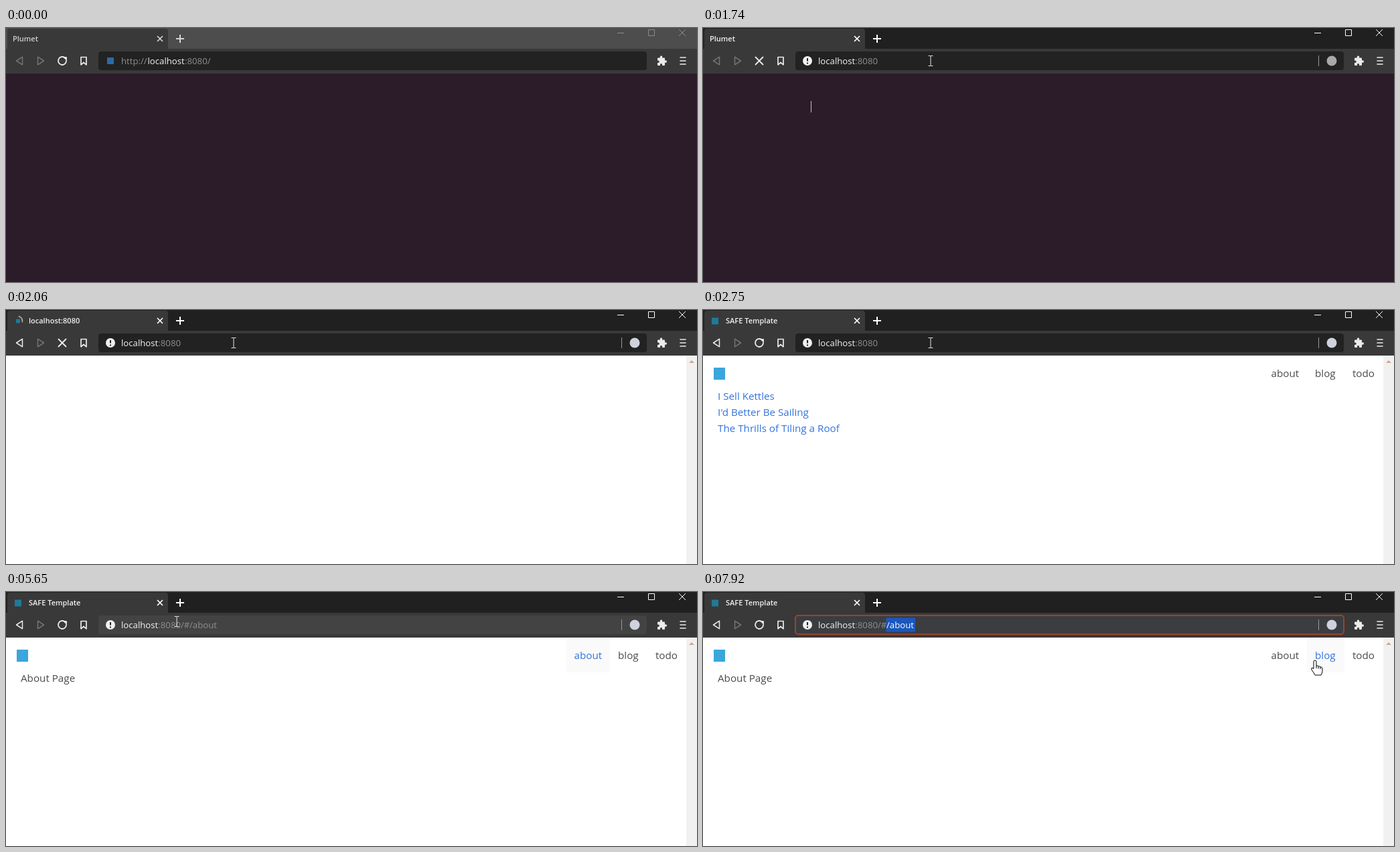
Animation of 1032x379 px, one loop 8 s. Source, as an HTML page:

```html
<!DOCTYPE html>
<html lang="en">
<head>
<meta charset="utf-8">
<title>Browser</title>
<style>
  html, body { margin: 0; width: 100%; height: 100%; overflow: hidden; background: #202020; }
  svg { display: block; width: 100%; height: 100%; }
  text { font-family: "Open Sans", "Noto Sans", sans-serif; white-space: pre; }
  .tab { font-size: 11px; font-weight: 600; }
  .url { font-size: 13.2px; fill: #8f8f8f; }
  .page { font-size: 15.2px; fill: #4a4a4a; }
  .page .link { fill: #3273dc; }
  .line { fill: none; stroke-linejoin: round; stroke-linecap: round; }
</style>
</head>
<body>
<svg viewBox="0 0 1032 379" preserveAspectRatio="none">
  <!-- title bar -->
  <rect id="titleBar" width="1032" height="32"/>
  <path d="M2 31V5q0-4 4-4h232q4 0 4 4v26z" fill="#393939"/>
  <rect id="spark" fill="#1d7b99"/>
  <path id="spinner" class="line" d="M22.5 11.2a7 7 0 0 1 0 9.6" stroke="#d3a78f" stroke-width="1.6"/>
  <text id="title" class="tab" y="20"></text>
  <g id="tabIcons" fill="none">
    <path d="M226 12l8 8m0-8l-8 8" stroke-width="1.7"/>
    <path d="M254 16h12m-6-6v12" stroke-width="2"/>
  </g>
  <path id="winIcons" fill="none" d="M913 7.5h10M959.5 2.5h9v9h-9zM1005 2l10 10m0-10l-10 10"/>

  <!-- toolbar -->
  <rect y="31" width="1032" height="37" fill="#393939"/>
  <g class="line" stroke-width="1.5" stroke="#ececec">
    <path id="back" d="M24.5 43.2v11.6L15.5 49z"/>
    <path d="M47.5 43.2v11.6l9-5.8z" stroke="#747474"/>
    <g id="reload" stroke-width="1.8">
      <path d="M87.6 44.2A6 6 0 1 0 90 49"/>
      <path d="M86.2 43.6h4.2v4.2z" fill="#ececec" stroke-width="1"/>
    </g>
    <path id="stop" d="M78.5 43.5l11 11m0-11l-11 11" stroke-width="1.8"/>
    <path d="M112 43.5h8v11.3l-4-3.3-4 3.3z" stroke-width="1.7"/>
    <path d="M1007 44h8m-8 5h8m-8 5h8" stroke-width="1.6"/>
  </g>
  <path fill="#ececec" d="M973 45.5q0-1 1-1h3q-.8-3 1.5-3t1.5 3h3q1 0 1 1v3q3-.8 3 1.5t-3 1.5v3.5q0 1-1 1h-3q.5-3-1.500-3t-1.500 3h-3q-1 0-1-1v-3q2.800.3 2.800-1.800t-2.800-1.700z"/>
  <rect id="bar" x="138" y="35" width="819" height="28" rx="4"/>
  <rect id="ring" x="138" y="35" width="819" height="28" rx="4" fill="none" stroke="#98432f" stroke-width="2"/>
  <rect id="siteMark" x="151" y="44" width="10" height="10" fill="#2d69a8"/>
  <g id="siteInfo">
    <circle cx="156" cy="49" r="7" fill="#f0f0f0"/>
    <path d="M156 45v4.500m0 2v2" stroke="#222" stroke-width="2"/>
  </g>
  <g id="shield">
    <path d="M919.5 41v16" stroke="#9a9a9a"/>
    <circle id="badge" cx="939" cy="49" r="7.500"/>
  </g>
  <rect id="selection" x="273.500" y="38.500" height="21" fill="#1b57bd"/>
  <g class="url">
    <text id="scheme" x="172" y="54">http://</text>
    <text id="host" y="54" fill="#f4f4f4">localhost</text>
    <text id="port" y="54"></text>
    <text id="hash" x="261" y="54">/#</text>
    <text id="route" x="274" y="54">/about</text>
  </g>

  <!-- page -->
  <rect id="paper" y="68" width="1032" height="311"/>
  <path id="caret" d="M161.500 109v17" stroke="#c9c3c8"/>
  <g id="scroll">
    <rect x="1016" y="68" width="16" height="311" fill="#f1f1f1"/>
    <path d="M1020 79l4-4 4 4z" fill="#d2a58e"/>
  </g>
  <g id="nav" class="page">
    <rect x="16" y="86" width="17" height="18" fill="#3ba6db"/>
    <rect id="aboutBox" x="837" y="68" width="65" height="52" fill="#fafafa"/>
    <rect id="blogBox" x="902" y="68" width="56" height="52" fill="#fafafa"/>
    <text id="about" x="848.500" y="100">about</text>
    <text id="blog" x="914" y="100">blog</text>
    <text x="970" y="100">todo</text>
  </g>
  <g id="list" class="page">
    <text class="link" x="22" y="134">I Sell Kettles</text>
    <text class="link" x="22" y="158">I'd Better Be Sailing</text>
    <text class="link" x="22" y="182">The Thrills of Tiling a Roof</text>
  </g>
  <text id="aboutPage" class="page" x="22" y="134">About Page</text>

  <!-- pointers, hot spot at 0,0 -->
  <path id="beam" class="line" d="M-3-7.500h2.500l.5.5.5-.5H3M0-7V7M-3 7.500h2.500L0 7l.5.5H3" stroke="#e6e6e6"/>
  <path id="arrow" d="M.5.500v16l3.700-3.500 2.600 6 2.500-1.100-2.600-5.900h5z" fill="#fff" stroke="#000"/>
  <g id="hand" stroke="#000" stroke-linejoin="round">
    <path d="M-2 1Q-2-1 0-1T2 1V7Q4 6 5 8 7 7 8 9 10 8 11 11v4q0 3-2 6H0Q-2 17-5 13-6 10-4 10l2 1.500z" fill="#fff"/>
    <path d="M2 7v4m3-3v3.500M8 9v3" fill="none"/>
  </g>
</svg>
<script>
const LOOP = 8000;
const el = {};
document.querySelectorAll('[id]').forEach(n => el[n.id] = n);

// pointer route: time, x, y
const route = [
  [100, 635, 379], [400, 570, 285], [650, 420, 120], [890, 344, 50], [1040, 340, 49],
  [3230, 340, 49], [3450, 400, 95], [3600, 520, 142], [3720, 660, 155], [3850, 790, 128],
  [3990, 858, 91], [4150, 858, 90], [4220, 866, 92], [4320, 866, 92], [4390, 866, 101],
  [4640, 866, 101], [4860, 700, 72], [5050, 430, 50], [5330, 251, 44], [5590, 251, 44],
  [5650, 255, 44], [5880, 272, 49], [5960, 272, 49], [6030, 277, 49], [6270, 277, 49],
  [6590, 324, 46], [6670, 324, 46], [7060, 405, 73], [7450, 405, 73],
  [7600, 560, 78], [7760, 790, 94], [7920, 914, 103]
];

function pointerAt(t) {
  const i = route.findIndex(p => p[0] > t);
  if (i < 0) return route[route.length - 1].slice(1);
  if (i === 0) return route[0].slice(1);
  const [t0, x0, y0] = route[i - 1], [t1, x1, y1] = route[i];
  const k = (t - t0) / (t1 - t0);
  return [x0 + (x1 - x0) * k, y0 + (y1 - y0) * k];
}

const within = (t, a, b) => t >= a && t < b;
const clamp = v => Math.max(0, Math.min(1, v));
const show = (id, on) => el[id].setAttribute('display', on ? 'inline' : 'none');

function set(id, attrs) {
  for (const k in attrs) el[id].setAttribute(k, attrs[k]);
}

function label(id, text) {
  if (el[id].textContent !== text) el[id].textContent = text;
}

function drawWindow(t) {
  const active = t >= 100, visited = t >= 1740, left = t >= 1890;
  set('titleBar', { fill: active ? '#202020' : '#4d4d4d' });
  set('tabIcons', { stroke: active ? '#fff' : '#d4d4d4' });
  set('winIcons', { stroke: active ? '#fff' : '#8c8c8c' });
  set('title', { x: left ? 34 : 10, fill: active ? '#f2f2f2' : '#d0d0d0' });
  label('title', !left ? 'Plumet' : t < 2210 ? 'localhost:8080' : 'SAFE Template');

  const size = t < 2750 ? 6 : 10;
  show('spark', left);
  set('spark', { x: 18 - size / 2, y: 16.5 - size / 2, width: size, height: size });
  show('spinner', within(t, 1890, 2600));
  set('spinner', { transform: `rotate(${-(t - 1970) * 0.36} 18 16)` });

  const loading = within(t, 1740, 2600);
  show('stop', loading);
  show('reload', !loading);
  set('back', { stroke: left ? '#ececec' : '#747474' });
  show('siteMark', !visited);
  show('siteInfo', visited);
  show('shield', visited);
  set('badge', { fill: left ? '#cfd2dc' : '#a9a9a9' });
}

function drawAddress(t) {
  const visited = t >= 1740, focused = t >= 6270, routed = t >= 4390;
  const hover = Math.round(34 + 33 * clamp((t - 4880) / 200));
  set('bar', { fill: focused ? '#3b3d41' : `rgb(${hover},${hover},${hover})` });
  show('ring', focused);
  show('scheme', !visited);
  set('host', { x: visited ? 172 : 211.5 });
  set('port', { x: visited ? 227.3 : 267 });
  label('port', visited ? ':8080' : ':8080/');
  show('hash', routed);
  show('route', routed);
  set('route', { fill: t >= 6500 ? '#fff' : '#8f8f8f' });
  set('selection', { width: 43.5 * clamp((t - 6300) / 230) });
}

function drawPage(t, x, y) {
  set('paper', { fill: t < 1890 ? '#2c1c2a' : t < 2060 ? '#35363a' : '#fff' });
  show('caret', within(t, 100, 600) || within(t, 1040, 1890));
  show('scroll', t >= 2060);
  show('nav', t >= 2350);
  show('list', within(t, 2520, 4390));
  show('aboutPage', t >= 4390);

  const inNav = t >= 2350 && within(y, 68, 120);
  const onAbout = inNav && within(x, 837, 902), onBlog = inNav && within(x, 902, 958);
  const aboutHot = onAbout || within(t, 4390, 6270);
  show('aboutBox', aboutHot);
  show('blogBox', onBlog);
  set('about', { class: aboutHot ? 'link' : '' });
  set('blog', { class: onBlog ? 'link' : '' });

  const kind = t < 100 ? '' : y < 68 || t < 1740 ? 'beam' : onAbout || onBlog ? 'hand' : 'arrow';
  for (const id of ['beam', 'arrow', 'hand']) {
    show(id, id === kind);
    set(id, { transform: `translate(${x.toFixed(1)} ${y.toFixed(1)})` });
  }
}

function draw(t) {
  drawWindow(t);
  drawAddress(t);
  drawPage(t, ...pointerAt(t));
}

const start = performance.now();
function tick() {
  draw((performance.now() - start) % LOOP);
  requestAnimationFrame(tick);
}
tick();
</script>
</body>
</html>
```
